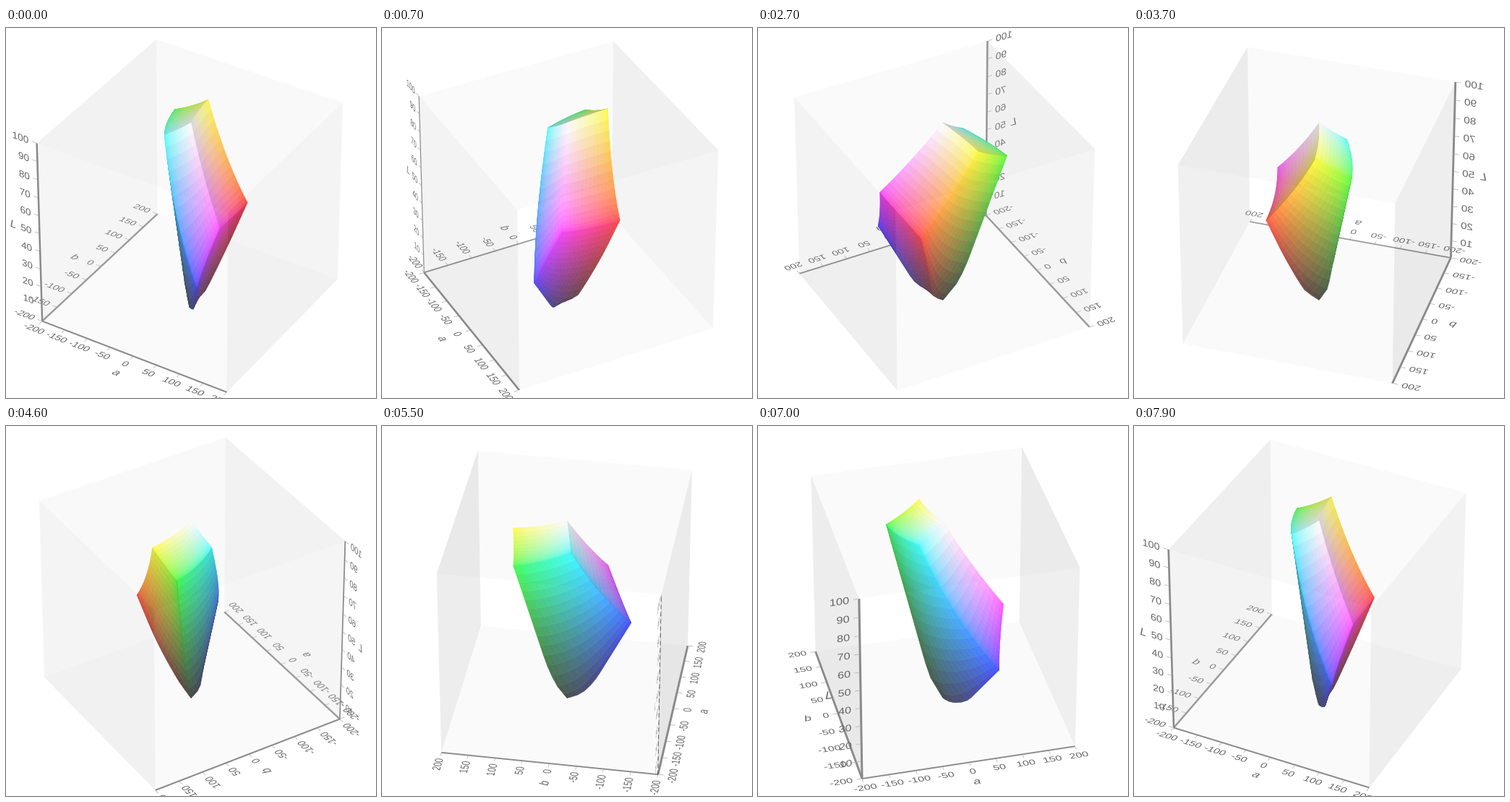
A matplotlib script that plays this animation: 512 by 512 pixels, repeating every 8 s.

```python
import itertools

import matplotlib.pyplot as plt
import numpy as np
from matplotlib.animation import FuncAnimation
from matplotlib.collections import LineCollection, PolyCollection
from matplotlib.patches import PathPatch
from matplotlib.path import Path
from matplotlib.textpath import TextPath

SIZE, FRAMES, INTERVAL = 512, 80, 100
HALF = 151            # half the box edge, in scene units
DISTANCE = 5000       # camera distance
TILT = np.radians(35.7)
SIN_T, COS_T = np.sin(TILT), np.cos(TILT)
GLASS = 0.15
STEPS = 15
A, B, L = np.eye(3)

KEY_FRAMES = [0, 14, 27, 37, 55, 70, 79]
KEY_ANGLES = [31.8, 93.7, 152, 197, 279.3, 346.2, 386.3]


def project(points, c, s):
    """Return screen positions and nearness to the camera."""
    a, b, up = np.moveaxis(np.asarray(points, float), -1, 0)
    right, toward = a * c + b * s, a * s - b * c
    near = toward * COS_T + up * SIN_T
    scale = DISTANCE / (DISTANCE - near)
    x = SIZE / 2 + right * scale
    y = SIZE / 2 - (up * COS_T - toward * SIN_T) * scale
    return np.stack([x, y], -1), near


def rgb_to_scene(rgb):
    linear = np.where(rgb <= 0.04045, rgb / 12.92, ((rgb + 0.055) / 1.055) ** 2.4)
    matrix = np.array([[0.4124, 0.3576, 0.1805],
                       [0.2126, 0.7152, 0.0722],
                       [0.0193, 0.1192, 0.9505]])
    xyz = linear @ matrix.T / matrix.sum(1)
    f = np.where(xyz > 0.008856, np.cbrt(xyz), 7.787 * xyz + 16 / 116)
    x, y, z = np.moveaxis(f, -1, 0)
    lab = [500 * (x - y) / 200, 200 * (y - z) / 200, (116 * y - 66) / 50]
    return np.stack(lab, -1) * HALF


def build_solid():
    quads, colors, normals = [], [], []
    t = np.linspace(0, 1, STEPS + 1)
    u, v = np.meshgrid(t, t)
    for axis, level in itertools.product(range(3), (0, 1)):
        rgb = np.insert(np.stack([u, v], -1), axis, level, axis=-1)
        p = rgb_to_scene(rgb)
        quad = np.stack([p[:-1, :-1], p[1:, :-1], p[1:, 1:], p[:-1, 1:]], 2).reshape(-1, 4, 3)
        normal = np.cross(quad[:, 2] - quad[:, 0], quad[:, 3] - quad[:, 1])
        normal *= np.sign((normal * quad.mean(1)).sum())
        normal /= np.linalg.norm(normal, axis=1, keepdims=True) + 1e-9
        quads.append(quad)
        normals.append(normal)
        colors.append(((rgb[:-1, :-1] + rgb[1:, 1:]) / 2).reshape(-1, 3))
    return map(np.concatenate, (quads, colors, normals))


def build_box():
    square = np.array([[-1, -1], [1, -1], [1, 1], [-1, 1]])
    return [(np.insert(square, axis, side, axis=1) * HALF, side * np.eye(3)[axis])
            for axis, side in itertools.product(range(3), (-1, 1))]


def flat_text(text, anchor, up, align, size=16, style="normal"):
    """Outline of a text lying in the plane of A and up."""
    path = TextPath((0, 0), text, size=size,
                    prop=dict(family="Liberation Sans", style=style))
    box = path.get_extents()
    x0 = box.x1 if align == "right" else (box.x0 + box.x1) / 2
    xy = path.vertices - [x0, (box.y0 + box.y1) / 2]
    return anchor + xy[:, :1] * A + xy[:, 1:] * up, path.codes


QUADS, COLORS, NORMALS = build_solid()
BOX = build_box()

fig = plt.figure(figsize=(SIZE / 100, SIZE / 100), dpi=100, facecolor="white")
ax = fig.add_axes([0, 0, 1, 1])
ax.set(xlim=(0, SIZE), ylim=(SIZE, 0))
ax.axis("off")


def add(collection):
    return ax.add_collection(collection, autolim=False)


class Axis:
    """Ribbon, ticks and text along one box edge."""

    def __init__(self, name, along, out, up, values, low, high):
        corner = -HALF * (1 - along)

        def at(value):
            return corner + along * HALF * (2 * (value - low) / (high - low) - 1)

        start, end, side = at(low), at(high), 1.5 * out
        self.ribbon = np.array([start + side, end + side, end - side, start - side])
        self.ticks = np.array([[at(v) + side, at(v) + 8 * out] for v in values])
        align, gap = ("right", 14) if out[0] else ("center", 20)
        texts = [flat_text(str(v), at(v) + gap * out, up, align) for v in values]
        texts.append(flat_text(name, at((low + high) / 2) + 44 * out, up,
                               "center", 18, "italic"))
        self.verts, self.codes = map(np.concatenate, zip(*texts))
        self.lines = add(LineCollection([], colors="0.72", linewidths=0.6))
        self.band = add(PolyCollection([], facecolors="0.54", edgecolors="none"))
        self.dashes, = ax.plot([], [], color="0.3", lw=0.6, dashes=(7, 5))
        self.text = ax.add_patch(PathPatch(Path(np.zeros((1, 2))),
                                           facecolor="0.4", edgecolor="none"))

    def update(self, c, s, front, edge_on):
        ribbon = project(self.ribbon, c, s)[0]
        self.lines.set_segments(project(self.ticks, c, s)[0])
        self.band.set_verts([ribbon])
        self.dashes.set_data(*ribbon[:2].T)
        self.dashes.set_visible(edge_on)
        self.text.set_path(Path(project(self.verts, c, s)[0], self.codes))
        for artist in (self.lines, self.band, self.dashes, self.text):
            artist.set_zorder(5 if front else 2)


WIDE = range(-200, 201, 50)
axis_a = Axis("a", A, -B, B, WIDE, -200, 200)
axis_b = Axis("b", B, -A, B, WIDE, -200, 200)
axis_l = Axis("L", L, -A, L, range(10, 101, 10), 0, 100)
back = add(PolyCollection([], edgecolors="none", zorder=1))
solid = add(PolyCollection([], linewidths=0.4, zorder=3))
glass = add(PolyCollection([], edgecolors="none", zorder=4))


def update_box(view, c, s):
    for panes, is_front in ((back, False), (glass, True)):
        faces = [(p, n @ view) for p, n in BOX if (n @ view > 0) == is_front]
        panes.set_verts([project(p, c, s)[0] for p, _ in faces])
        lights = [min(1, 0.36 + 0.9 * abs(facing)) for _, facing in faces]
        panes.set_facecolor([(g, g, g, GLASS) for g in lights])


def update_solid(view, c, s):
    facing = NORMALS @ view
    shown = np.flatnonzero(facing > -0.03)
    xy, near = project(QUADS[shown], c, s)
    order = np.argsort(near.mean(1))
    shown = shown[order]
    glow = np.clip(0.7 + 0.5 * facing[shown], 0, 1)[:, None]
    colors = np.clip((0.85 * COLORS[shown] + 0.17) * glow, 0, 1)
    solid.set_verts(xy[order])
    solid.set_facecolor(colors)
    solid.set_edgecolor(colors)


def draw(frame):
    angle = np.radians(np.interp(frame, KEY_FRAMES, KEY_ANGLES))
    c, s = np.cos(angle), np.sin(angle)
    view = np.array([s * COS_T, -c * COS_T, SIN_T])
    update_box(view, c, s)
    update_solid(view, c, s)
    axis_a.update(c, s, c > 0, False)
    axis_b.update(c, s, s < 0, False)
    axis_l.update(c, s, c > s, abs(c) < 0.2)
    return []


anim = FuncAnimation(fig, draw, frames=FRAMES, interval=INTERVAL,
                     repeat=True, repeat_delay=0)
plt.show()
```
